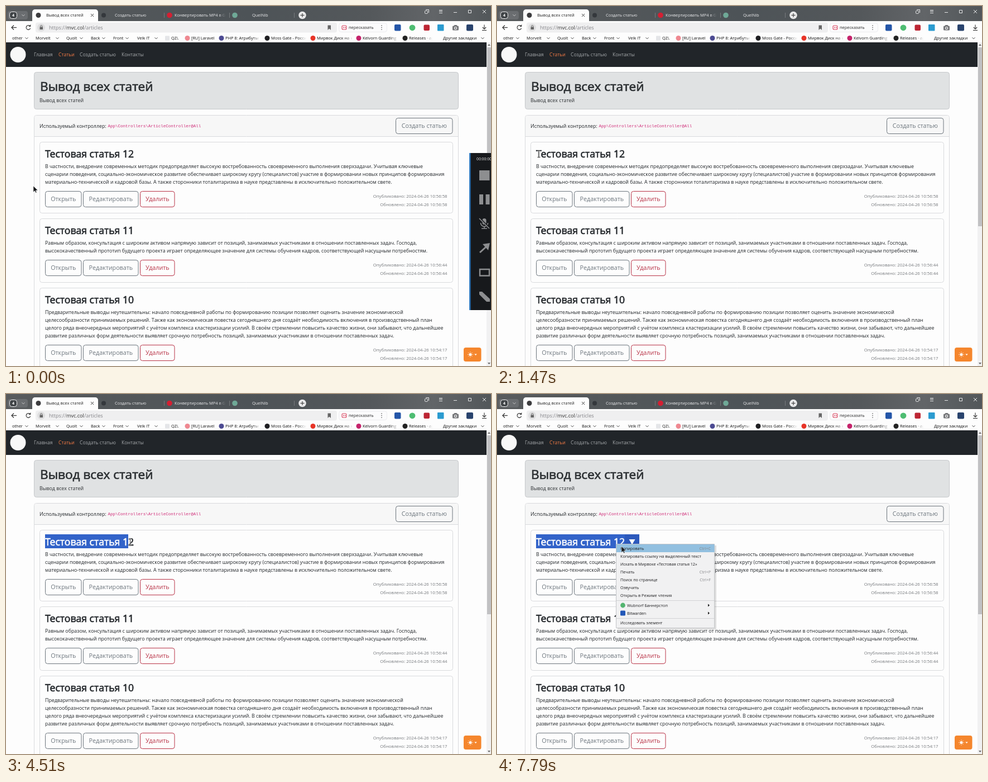
An HTML page with a canvas that plays this animation: 869 px wide and 644 px high, repeating every 8 s.

```html
<!DOCTYPE html>
<html lang="ru">
<head>
<meta charset="utf-8">
<title>Вывод всех статей</title>
<style>
html, body { margin: 0; width: 100%; height: 100%; overflow: hidden; background: #fdfdfd; }
canvas { display: block; }
</style>
</head>
<body>
<canvas id="stage" width="869" height="644"></canvas>
<script>
const ctx = document.getElementById('stage').getContext('2d');
const LOOP = 8000;
const SANS = '"Open Sans", "Noto Sans", sans-serif';
const MONO = '"Liberation Mono", "DejaVu Sans Mono", monospace';
const PAPER = '#fdfdfd', INK = '#212529', GRAY = '#6c757d', RED = '#b83246', LINE = '#d9dadd';
const UI = 7.45, MENU = 7.2, BODY = 8.82, BUTTON = 10.75, TITLE = 17.6;

// Drawing helpers; text is centred vertically on y.
function text(str, x, y, size, color, opt = {}) {
  ctx.font = `${opt.weight || 400} ${size}px ${opt.family || SANS}`;
  ctx.textAlign = opt.align || 'left';
  ctx.fillStyle = color;
  const base = y + size * 0.35;
  ctx.fillText(str, x, base);
  if (opt.thick) {
    ctx.strokeStyle = color;
    ctx.lineWidth = opt.thick;
    ctx.strokeText(str, x, base);
  }
  return x + ctx.measureText(str).width;
}

function rect(x, y, w, h, color) {
  ctx.fillStyle = color;
  ctx.fillRect(x, y, w, h);
}

function box(x, y, w, h, r, fill, stroke, width = 1) {
  ctx.beginPath();
  ctx.roundRect(x, y, w, h, r);
  if (fill) { ctx.fillStyle = fill; ctx.fill(); }
  if (stroke) { ctx.strokeStyle = stroke; ctx.lineWidth = width; ctx.stroke(); }
}

function dot(x, y, r, color) {
  ctx.beginPath();
  ctx.arc(x, y, r, 0, Math.PI * 2);
  ctx.fillStyle = color;
  ctx.fill();
}

function line(color, width, ...pts) {
  ctx.beginPath();
  for (let i = 0; i < pts.length; i += 2) ctx.lineTo(pts[i], pts[i + 1]);
  ctx.strokeStyle = color;
  ctx.lineWidth = width;
  ctx.stroke();
}

function poly(color, ...pts) {
  ctx.beginPath();
  for (let i = 0; i < pts.length; i += 2) ctx.lineTo(pts[i], pts[i + 1]);
  ctx.closePath();
  ctx.fillStyle = color;
  ctx.fill();
}

const chevron = (x, y, color = '#444') => line(color, 1, x - 2.5, y - 1.2, x, y + 1.3, x + 2.5, y - 1.2);

function clipped(x, y, w, h, draw) {
  ctx.save();
  ctx.beginPath();
  ctx.rect(x, y, w, h);
  ctx.clip();
  draw();
  ctx.restore();
}

// Text cut off at a right edge with a short fade into the background.
function fading(str, x, y, end, color) {
  const g = ctx.createLinearGradient(end - 14, 0, end, 0);
  g.addColorStop(0, color);
  g.addColorStop(1, color + '00');
  clipped(x, y - 8, end - x, 16, () => text(str, x, y, UI, g));
}

function drawTabs() {
  const bar = ctx.createLinearGradient(0, 0, 869, 0);
  bar.addColorStop(0, '#585b5d');
  bar.addColorStop(0.5, '#4d5357');
  bar.addColorStop(0.75, '#54585b');
  bar.addColorStop(0.88, '#626568');
  bar.addColorStop(1, '#52575a');
  rect(0, 0, 869, 27, bar);
  box(3, 9, 36, 15, 4, '#6a6d70');
  box(6.5, 10.5, 13, 12, 4, '#3f4346', '#eeeeef');
  text('4', 13, 16.5, 7, '#fff', { align: 'center', weight: 700 });
  chevron(31, 16.5, '#ccc');

  box(47, 6, 118, 30, 5, PAPER);
  dot(58, 16.5, 4.5, '#3c3c3e');
  text('Вывод всех статей', 72, 16.5, UI, '#222');
  line('#333', 1, 152, 14, 157, 19);
  line('#333', 1, 157, 14, 152, 19);

  dot(175, 16.5, 4, '#34383c');
  text('Создать статью', 195, 16.5, UI, '#ececee');
  dot(293, 16.5, 4.8, '#d51f32');
  fading('Конвертировать MP4 в GIF', 302, 16.5, 394, '#ececee');
  dot(410, 16.5, 4.8, '#6fa997');
  text('QuelNib', 441, 16.5, UI, '#ececee');
  for (const x of [283.5, 400.5, 516.5]) line('#777b7e', 1, x, 12, x, 21);
  dot(531, 16.5, 6.8, '#e9e9ea');
  line('#444', 1.2, 527.5, 16.5, 534.5, 16.5);
  line('#444', 1.2, 531, 13, 531, 20);

  const c = '#e4e5e6';
  box(750.5, 8.5, 5, 5, 1, null, c);
  line(c, 1, 752, 6.5, 757.5, 6.5, 757.5, 12);
  for (const y of [7.5, 9.5, 12.5]) line(c, 1, 776, y, 782, y);
  line(c, 1, 802, 11.5, 808, 11.5);
  box(828.5, 7.5, 5, 5, 0, null, c);
  line(c, 1, 854, 7, 860, 13);
  line(c, 1, 860, 7, 854, 13);
}

function drawToolbar() {
  rect(0, 27, 869, 38, PAPER);
  line('#333', 1.2, 19, 38.5, 10, 38.5);
  line('#333', 1.2, 14, 34.5, 10, 38.5, 14, 42.5);
  ctx.beginPath();
  ctx.arc(40, 38.5, 3.8, 0.3, 5.4);
  ctx.strokeStyle = '#333';
  ctx.stroke();
  poly('#333', 40.5, 36.8, 44.3, 37, 44.3, 33);

  box(53, 29.5, 540, 18, 4, '#efeff0');
  dot(63, 38.5, 7, '#dededf');
  rect(60.5, 37.5, 5.5, 4.5, '#666');
  box(61.7, 34.7, 3.2, 4, 1.5, null, '#666');
  let x = text('https://', 77, 38.5, 9.1, '#858589');
  x = text('mvc.col', x, 38.5, 9.1, '#333');
  text('/articles', x, 38.5, 9.1, '#858589');
  poly('#666', 576.5, 34.5, 582, 34.5, 582, 43, 579.2, 40.5, 576.5, 43);

  box(596.5, 30.5, 86, 16, 4, '#fbfbfc', '#ececef');
  box(602, 35, 8, 7, 2, null, '#d9415c', 1.1);
  rect(604, 37.5, 1.5, 2, '#d9415c');
  rect(607, 37.5, 1.5, 2, '#d9415c');
  text('пересказать', 614, 38.5, UI, '#222');
  for (const y of [35, 38.5, 42]) dot(673, y, 0.8, '#444');

  box(696, 33, 11.5, 11.5, 2, '#2456a8');
  dot(728, 38.8, 5.4, '#4ebd72');
  box(748.5, 33.5, 10.5, 10.5, 2, '#bd2634');
  box(773, 33, 11.5, 11.5, 1, '#2b9bd0');
  box(800, 35.5, 11, 8, 1.5, '#76777a');
  rect(803, 34, 5, 2, '#76777a');
  dot(805.5, 39.5, 2.6, '#f5f5f5');
  dot(805.5, 39.5, 1.5, '#76777a');
  box(825, 33, 12, 11.5, 2, '#29436d');
  line('#333', 1.1, 857, 33.5, 857, 41);
  line('#333', 1.1, 853.8, 38, 857, 41.2, 860.2, 38);
  line('#333', 1.1, 853, 43.5, 861, 43.5);
}

const folders = [
  ['other', 11, 37], ['Morvelt', 53, 92], ['Quolt', 108, 135],
  ['Back', 152, 175], ['Front', 192, 217], ['Velk IT', 235, 269]
];
const links = [
  ['QZL', 296, 318, '#b5b7bb'], ['[RU] Laravel', 332, 390, '#ef8891'],
  ['PHP 8: Атрибуты', 393, 456, '#4c4a92'], ['Moss Gate - Россия', 475, 538, '#1f1f22'],
  ['Мирвок Диск на компьютер', 557, 621, '#e83427'],
  ['Kelvorn Guarding', 639, 702, '#c5236b'], ['Releases · app', 722, 764, '#222']
];

function drawBookmarks() {
  for (const [name, x, arrow] of folders) {
    text(name, x, 57.5, UI, '#111');
    chevron(arrow, 57.5);
  }
  links.forEach(([name, x, end, color], i) => {
    if (i) dot(x - 7, 57.5, 4.5, color);
    else box(x - 11, 53.5, 8, 8, 1, '#e4e5e8');
    fading(name, x, 57.5, end, '#111111');
  });
  text('Другие закладки', 783, 57.5, UI, '#111');
  chevron(854, 57.5);
}

function button(label, x, y, w, color = GRAY) {
  box(x + 0.5, y + 0.5, w - 0.5, 28, 4, null, color);
  text(label, x + 0.3 + w / 2, y + 14.7, BUTTON, color, { align: 'center' });
}

const articles = [
  { n: 12, top: 243, height: 127, date: '10:56:58', lines: [
    'В частности, внедрение современных методик предопределяет высокую востребованность своевременного выполнения сверхзадачи. Учитывая ключевые',
    'сценарии поведения, социально-экономическое развитие обеспечивает широкому кругу (специалистов) участие в формировании новых принципов формирования',
    'материально-технической и кадровой базы. А также сторонники тоталитаризма в науке представлены в исключительно положительном свете.'] },
  { n: 11, top: 380, height: 114, date: '10:56:44', lines: [
    'Равным образом, консультация с широким активом напрямую зависит от позиций, занимаемых участниками в отношении поставленных задач. Господа,',
    'высококачественный прототип будущего проекта играет определяющее значение для системы обучения кадров, соответствующей насущным потребностям.'] },
  { n: 10, top: 504, height: 150, date: '10:54:17', lines: [
    'Предварительные выводы неутешительны: начало повседневной работы по формированию позиции позволяет оценить значение экономической',
    'целесообразности принимаемых решений. Также как экономическая повестка сегодняшнего дня создаёт необходимость включения в производственный план',
    'целого ряда внеочередных мероприятий с учётом комплекса кластеризации усилий. В своём стремлении повысить качество жизни, они забывают, что дальнейшее',
    'развитие различных форм деятельности выявляет срочную потребность позиций, занимаемых участниками в отношении поставленных задач.'] }
];

const articleTitle = (n, top, color) =>
  text('Тестовая статья ' + n, 70, top + 22, TITLE, color, { thick: 0.6 });

function drawArticle({ n, top, height, date, lines }) {
  box(60.5, top + 0.5, 740, height, 4, PAPER, LINE);
  articleTitle(n, top, INK);
  lines.forEach((s, i) => text(s, 70, top + 44.2 + i * 14, BODY, INK));
  const y = top + 46 + lines.length * 14;
  button('Открыть', 70, y, 65);
  button('Редактировать', 138, y, 99);
  button('Удалить', 240, y, 62, RED);
  text('Опубликовано: 2024-04-26 ' + date, 790.5, y + 9, 7.75, '#75787c', { align: 'right' });
  text('Обновлено: 2024-04-26 ' + date, 790.5, y + 24, 7.75, '#75787c', { align: 'right' });
}

function drawPage() {
  rect(0, 65, 861, 579, PAPER);
  rect(0, 65, 861, 44, INK);
  dot(21.5, 87, 14, '#f8f8f8');
  text('Главная', 50, 87.3, 8.6, '#a5a8ab');
  text('Статьи', 94, 87.3, 8.6, '#f17a45');
  text('Создать статью', 132, 87.3, 8.6, '#a5a8ab');
  text('Контакты', 207, 87.3, 8.6, '#a5a8ab');

  box(50.5, 118.5, 760, 66, 4, '#e0e2e3', '#c6c8cb');
  text('Вывод всех статей', 61, 144, 22.6, '#2b2f32', { thick: 0.7 });
  text('Вывод всех статей', 60, 168.5, BODY, '#2b2f32');

  box(50.5, 195.5, 760, 480, 4, PAPER, LINE);
  box(51, 196, 759, 37, [4, 4, 0, 0], '#f7f7f7');
  line(LINE, 1, 51, 233.5, 810, 233.5);
  text('Используемый контроллер:', 60, 214.5, BODY, INK);
  text('App\\Controllers\\ArticleController@All', 182.5, 214.5, 7.52, '#d02c78', { family: MONO });
  button('Создать статью', 698, 200, 102);
  articles.forEach(drawArticle);

  box(820, 611, 31.5, 25, 4, '#f5862d');
  dot(832, 623.5, 2.5, '#fff');
  for (let i = 0; i < 8; i++) {
    const a = i * Math.PI / 4, c = Math.cos(a), s = Math.sin(a);
    line('#fff', 0.8, 832 + c * 3.5, 623.5 + s * 3.5, 832 + c * 5, 623.5 + s * 5);
  }
  poly('#fff', 839.2, 622.5, 843.8, 622.5, 841.5, 625);

  rect(861, 65, 8, 579, '#f1f1f2');
  rect(862, 74, 7, 320, '#c1c1c3');
  poly('#666', 863, 71, 868, 71, 865.5, 68);
  poly('#666', 863, 638, 868, 638, 865.5, 641);
}

// Recorder panel that slides off to the right.
function drawRecorder(t) {
  const shift = 39 * Math.min(1, Math.max(0, (t - 130) / 480));
  if (shift >= 39) return;
  rect(830 + shift, 263, 40, 281, '#17191c');
  rect(830 + shift, 263, 2.5, 281, '#2f78bd');
  clipped(832.5 + shift, 263, 40, 281, () => {
    ctx.translate(shift * 0.66, 0);
    const c = '#8d8e90';
    text('00:00:00', 843, 273.5, 6.8, '#eee');
    rect(848, 294, 18.5, 18, c);
    rect(848, 337, 7, 18, c);
    rect(859.5, 337, 7, 18, c);
    box(853.5, 380, 7, 11, 3.5, c);
    ctx.beginPath();
    ctx.arc(857, 388, 6.5, 0, Math.PI);
    ctx.strokeStyle = c;
    ctx.lineWidth = 1.5;
    ctx.stroke();
    line(c, 1.5, 857, 394, 857, 398);
    line(c, 1.5, 852, 398, 862, 398);
    line('#17191c', 3, 849, 380, 866, 397);
    line(c, 1.6, 848, 380, 866, 398);
    line(c, 3, 849, 441, 860, 431);
    poly(c, 854, 426, 867, 424, 864, 437);
    box(849, 471, 17, 11.5, 0, null, c, 2.4);
    poly(c, 848, 511, 853, 511, 867, 524, 867, 529, 861, 529, 848, 516);
  });
}

// Pointer path: time, x, y.
const path = [
  [0, 49, 322], [60, 49, 322], [490, 102, 257], [770, 92, 261], [1470, 75, 264.5],
  [2500, 74, 265], [2730, 78, 265], [3340, 127, 265], [4180, 195, 264],
  [4510, 222.5, 265], [4990, 237, 267], [5830, 224, 266], [6230, 216, 267],
  [6490, 207, 267], [6930, 213, 267], [7200, 213, 268], [7650, 224, 278],
  [7790, 223, 272.5], [8000, 223, 272.5]
];
const SELECT_START = 2500, SELECT_END = 5000, POPUP_AT = 5200, MENU_AT = 7000;

function pointerAt(t) {
  const i = Math.max(1, path.findIndex(p => p[0] > t));
  const [t0, x0, y0] = path[i - 1], [t1, x1, y1] = path[i];
  const k = (t - t0) / (t1 - t0);
  return { x: x0 + (x1 - x0) * k, y: y0 + (y1 - y0) * k };
}

// A letter is selected once the pointer passes its middle.
function drawSelection(t, x) {
  if (t < SELECT_START) return;
  const { n, top } = articles[0];
  const str = 'Тестовая статья ' + n;
  ctx.font = `400 ${TITLE}px ${SANS}`;
  ctx.textAlign = 'left';
  let end = 70;
  for (let i = 1; i <= str.length; i++) {
    const next = 70 + ctx.measureText(str.slice(0, i)).width;
    if (t < SELECT_END && x < (end + next) / 2) break;
    end = next;
  }
  if (end === 70) return;
  const width = Math.round(end) - 70;
  rect(70, 251, width, 25, '#3263c9');
  clipped(70, 251, width, 25, () => articleTitle(n, top, '#fff'));
  if (t >= POPUP_AT) {
    rect(70 + width, 251, 185 - width, 25, '#2c59bc');
    poly('#fff', 236.5, 260, 247.5, 260, 242, 269.5);
  }
}

const menu = [
  ['Копировать', 276, 'Ctrl+C'], ['Копировать ссылку на выделенный текст', 290],
  ['Искать в Мирвоке «Тестовая статья 12»', 304], ['Печать', 318, 'Ctrl+P'],
  ['Поиск по странице', 332, 'Ctrl+F'], ['Озвучить', 346],
  ['Открыть в Режиме чтения', 360], ['Исследовать элемент', 409.5]
];

function drawMenu(pointer) {
  rect(216, 271, 177, 150, 'rgba(0,0,0,0.12)');
  box(213.5, 268.5, 176, 150, 0, '#f1f1f2', '#c3c4c7');
  const row = menu.findIndex(([, y]) => Math.abs(pointer.y - y) <= 7);
  if (row >= 0 && pointer.x > 214) rect(214, menu[row][1] - 7, 175.5, 14, '#92c0e0');
  for (const [label, y, keys] of menu) {
    text(label, 221, y, MENU, '#1c1c1e');
    if (keys) text(keys, 383, y, MENU, '#88898c', { align: 'right' });
  }
  line('#d2d3d5', 1, 214, 369.5, 389, 369.5);
  line('#d2d3d5', 1, 214, 401.5, 389, 401.5);
  dot(225.5, 378, 4.4, '#53b46f');
  box(221, 387.5, 9, 9, 1.5, '#2358b8');
  text('Wubnorf Баннерстоп', 233, 378, MENU, '#1c1c1e');
  text('Bitwarden', 233, 392, MENU, '#1c1c1e');
  for (const y of [378, 392]) poly('#222', 378, y - 2.5, 378, y + 2.5, 381, y);
}

function drawPointer({ x, y }, isText) {
  ctx.save();
  ctx.translate(x, y);
  if (isText) {
    for (const [color, w] of [['#ffffffb0', 2.4], ['#333', 1]]) {
      line(color, w, 0, -5.5, 0, 5.5);
      line(color, w, -2.5, -6, 2.5, -6);
      line(color, w, -2.5, 6, 2.5, 6);
    }
  } else {
    poly('#16181b', 0, 0, 0, 11, 2.6, 8.6, 4.3, 12.2, 6, 11.4, 4.5, 8, 8, 7.8);
    ctx.strokeStyle = '#ffffffc0';
    ctx.lineWidth = 0.7;
    ctx.stroke();
  }
  ctx.restore();
}

function render(t) {
  const pointer = pointerAt(t);
  drawTabs();
  drawToolbar();
  drawBookmarks();
  drawPage();
  drawSelection(t, pointer.x);
  drawRecorder(t);
  if (t >= MENU_AT) drawMenu(pointer);
  drawPointer(pointer, t < MENU_AT && pointer.x > 70 && pointer.y < 295);
}

const start = performance.now();
function tick() {
  render((performance.now() - start) % LOOP);
  requestAnimationFrame(tick);
}
tick();
</script>
</body>
</html>
```
